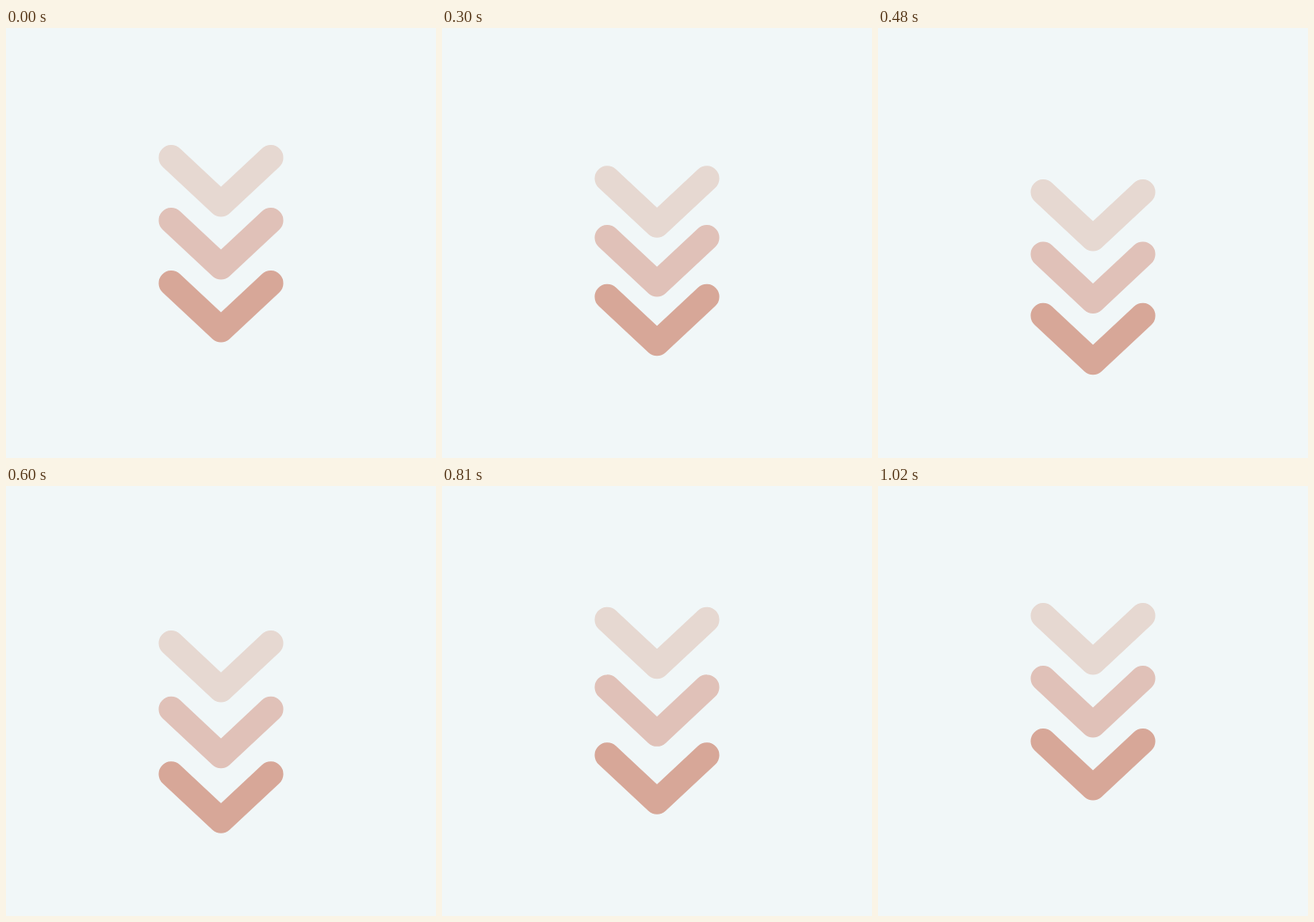
These frames come from a looping animation (500x500 px, 1.05 s). An HTML page:

```html
<!DOCTYPE html>
<html lang="en">
<head>
<meta charset="utf-8">
<title>Scroll down arrows</title>
<style>
  html, body { margin: 0; width: 100%; height: 100%; overflow: hidden; background: #f1f7f8; }
  svg { display: block; width: 100%; height: 100%; }
  path { fill: none; stroke-width: 29.4; stroke-linecap: round; stroke-linejoin: round; }
</style>
</head>
<body>
<svg viewBox="0 0 500 500"></svg>
<script>
const STEP = 30, STEPS = 35, TRAVEL = 40;

// Times are in steps: start of the drop, lowest point, back at rest.
const chevrons = [
  { y: 150.7, color: '#e6d8d1', start: 2, low: 16, rest: 30 },
  { y: 223.7, color: '#e0c1b8', start: 3, low: 17, rest: 32 },
  { y: 296.7, color: '#d7a798', start: 4, low: 18, rest: 34 }
];

const svg = document.querySelector('svg');
for (const c of chevrons) {
  c.path = document.createElementNS('http://www.w3.org/2000/svg', 'path');
  c.path.setAttribute('d', `M192.2 ${c.y}l57.8 54.1l57.8 -54.1`);
  c.path.setAttribute('stroke', c.color);
  svg.append(c.path);
}

function ease(from, to, t) {
  const u = Math.min(1, Math.max(0, (t - from) / (to - from)));
  return u * u * (3 - 2 * u);
}

function render(ms) {
  const t = Math.floor(ms / STEP + 0.01) % STEPS;
  for (const { path, start, low, rest } of chevrons) {
    const dy = TRAVEL * (ease(start, low, t) - ease(low, rest, t));
    path.setAttribute('transform', `translate(0 ${dy.toFixed(2)})`);
  }
}

const begin = performance.now();
function tick() {
  render(performance.now() - begin);
  requestAnimationFrame(tick);
}
tick();
</script>
</body>
</html>
```
